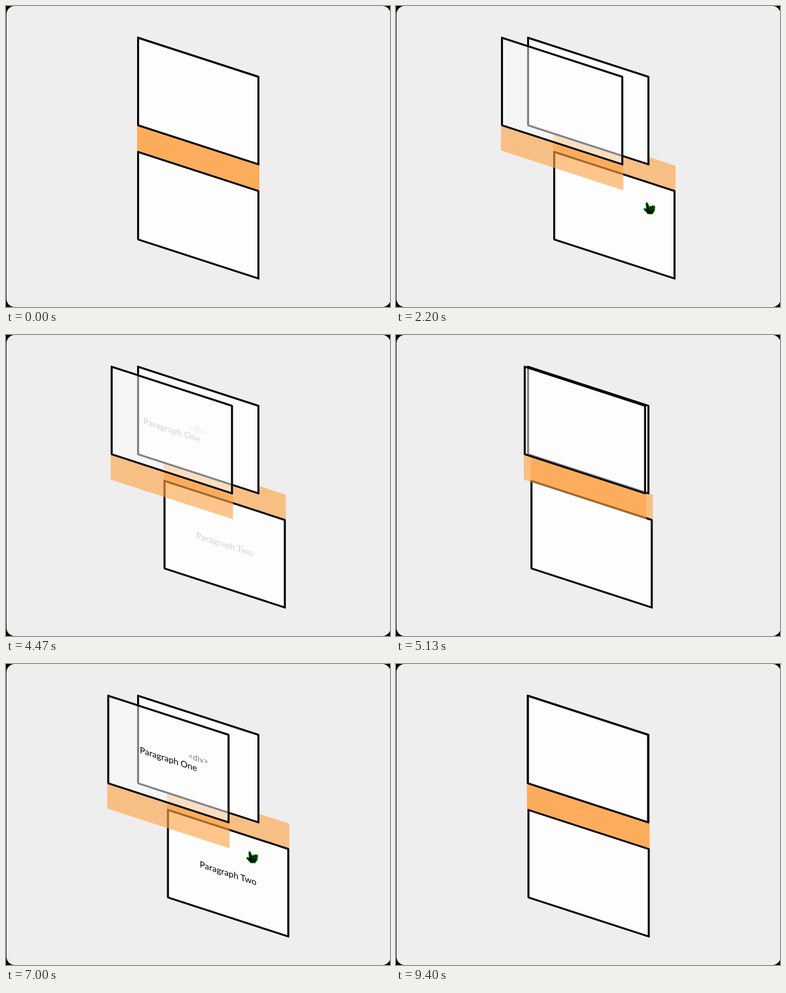
Animation of 750x588 px, one loop 9.47 s. Source, as an HTML page:

```html
<!DOCTYPE html>
<html lang="en">
<head>
<meta charset="utf-8">
<title>Collapsing margins</title>
<style>
  html, body { margin: 0; width: 100%; height: 100%; overflow: hidden; background: #000; }
  svg { display: block; width: 750px; height: 588px; }
  .panel { stroke: #09090d; stroke-width: 4; stroke-linejoin: round; fill: #fdfdfd; }
  .glass { fill: rgb(253 253 253 / .5); }
  .margin { fill: rgb(255 164 68 / .62); }
  text { font: 500 17px Lato, "Open Sans", sans-serif; fill: #09090d; text-anchor: middle; }
  .tag { font-size: 16px; }
  #hand { fill: #050805; stroke: #18c322; stroke-width: 1.4; stroke-linejoin: round; }
</style>
</head>
<body>
<svg viewBox="0 0 750 588">
  <rect x="1" width="750" height="588" rx="16" fill="#eee"/>

  <!-- every sheet is skewed about its left edge -->
  <g id="two">
    <g transform="translate(258 285) skewY(18)">
      <rect class="margin" x="-2" y="-50" width="239" height="50"/>
      <rect class="panel" width="235" height="171"/>
      <text class="label" x="117.5" y="91.5">Paragraph Two</text>
    </g>
  </g>
  <g transform="translate(258 62) skewY(18)">
    <rect class="panel" width="235" height="171"/>
    <text class="label tag" x="117.5" y="90.5">&lt;div&gt;</text>
  </g>
  <g id="one">
    <g transform="translate(258 62) skewY(18)">
      <rect class="margin" x="-2" y="172" width="239" height="49"/>
      <rect class="panel glass" width="235" height="171"/>
      <text class="label" x="117.5" y="91.5">Paragraph One</text>
    </g>
  </g>

  <g id="hand">
    <path d="M-1 1Q1-2 3 1L6 8Q8 5 10 7Q12 4 14 6Q17 5 17 9L16 16L12 22L3 22L-5 13Q-5 9 0 12Z"/>
    <path d="M6 8L7.5 16M10 8L11 16M14 8L14 15" stroke-width=".8"/>
  </g>
</svg>
<script>
  const LOOP = 9470, SPREAD = 60, TEXT_DELAY = 650;
  const RATE = { slide: 3.1, pointer: 4, show: 6, hide: 39 };

  // the pointer enters, rests over the sheets and leaves; they spread while hovered
  const visits = [
    { enter: 1395, open: 1588, close: 4418, leave: 4390,
      from: [582, 537], rest: [485, 378], to: [495, 568] },
    { enter: 5595, open: 5850, close: 7954, leave: 8040,
      from: [463, 557], rest: [473, 366], to: [588, 369] }
  ];

  const $ = id => document.getElementById(id);
  const one = $("one"), two = $("two"), hand = $("hand");
  const labels = document.querySelectorAll(".label");
  const decay = (ms, rate) => Math.exp(-rate * Math.max(0, ms) / 1000);
  const move = (el, x, y = 0) => el.setAttribute("transform", `translate(${x} ${y})`);

  function stateAt(t) {
    let spread = 0, text = 0;
    for (const { open, close } of visits) {
      if (t < open) break;
      const held = Math.min(t, close) - open;
      spread = 1 - (1 - spread) * decay(held, RATE.slide);
      text = 1 - decay(held - TEXT_DELAY, RATE.show);

      // the next visit interrupts the closing slide
      const next = visits.find(v => v.open > close)?.open ?? LOOP;
      const gone = Math.min(t, next) - close;
      spread *= decay(gone, RATE.slide);
      text *= decay(gone, RATE.hide);
    }
    return { spread, text };
  }

  function pointerAt(t) {
    const visit = visits.find(v => t >= v.enter && t < v.leave);
    if (!visit) return null;
    const { enter, leave, from, rest, to } = visit;
    const arriving = decay(t - enter, RATE.pointer);
    const leaving = decay(leave - t, RATE.pointer);
    return rest.map((r, i) => r + (from[i] - r) * arriving + (to[i] - r) * leaving);
  }

  function draw(now) {
    // 15 pictures per second
    const t = Math.floor((now % LOOP + 4) * 0.015) / 0.015;
    const { spread, text } = stateAt(t);
    move(one, -SPREAD * spread);
    move(two, SPREAD * spread);
    labels.forEach(l => l.style.opacity = text < 0.01 ? 0 : text);
    const tip = pointerAt(t);
    hand.style.display = tip ? "" : "none";
    if (tip) move(hand, ...tip);
  }

  const began = performance.now();
  (function tick() {
    draw(performance.now() - began);
    requestAnimationFrame(tick);
  })();
</script>
</body>
</html>
```
